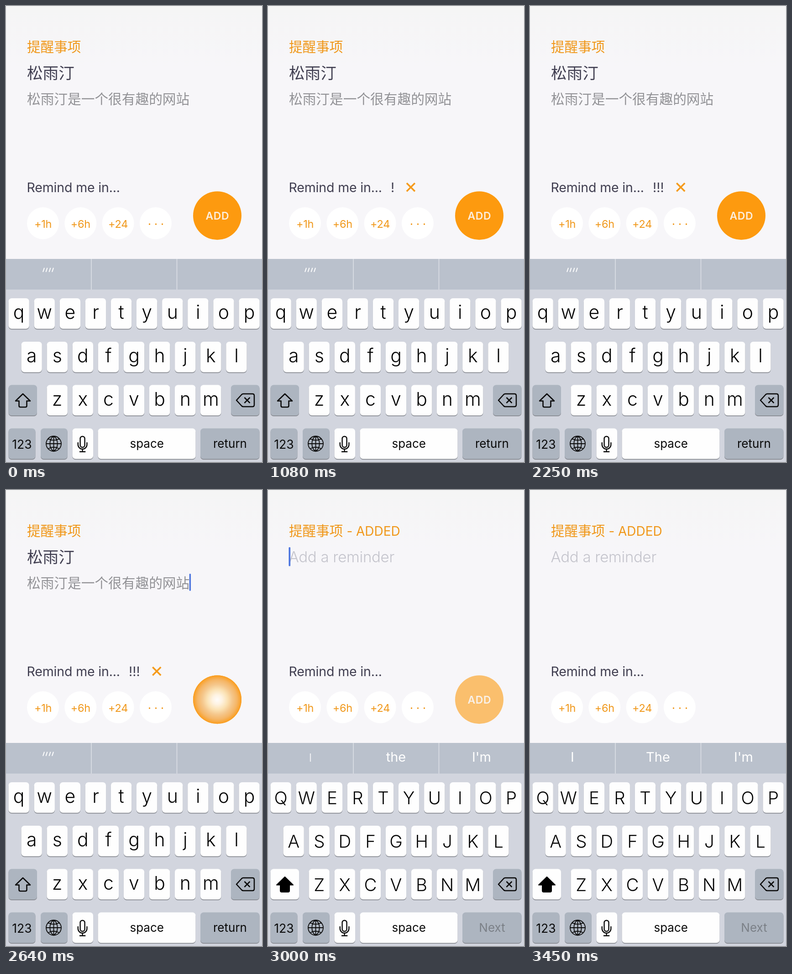
Animation of 561 by 997 pixels, one loop 3660 ms. Source, as an HTML page:

```html
<!DOCTYPE html>
<html lang="zh-CN">
<head>
<meta charset="utf-8">
<title>Reminder</title>
<style>
html, body { margin: 0; width: 100%; height: 100%; overflow: hidden; background: #f7f6f9; }
svg { display: block; width: 561px; height: 997px; }
text { font-family: Inter, "Noto Sans CJK SC", "Noto Sans CJK", sans-serif; white-space: pre; }
.cjk { font-family: "Noto Sans CJK SC", "Noto Sans CJK", sans-serif; }
</style>
</head>
<body>
<svg id="stage" viewBox="0 0 561 997" xmlns="http://www.w3.org/2000/svg">
  <defs>
    <linearGradient id="paper" x1="0" y1="0" x2="0" y2="1">
      <stop offset="0" stop-color="#f5f5f5"/>
      <stop offset=".25" stop-color="#f7f6f9"/>
    </linearGradient>
    <radialGradient id="glow" gradientUnits="userSpaceOnUse" cx="463" cy="458.3" r="53">
      <stop offset="0" stop-color="#fefcfa"/>
      <stop offset=".2" stop-color="#fef3e2"/>
      <stop offset=".42" stop-color="#fbe2b4"/>
      <stop offset=".62" stop-color="#f5c78c"/>
      <stop offset=".82" stop-color="#f5b565"/>
      <stop offset="1" stop-color="#fb9d1d"/>
    </radialGradient>
  </defs>
</svg>
<script>
const LOOP = 3660;
const ORANGE = '#fd9a0f', LABEL = '#f0981b', INK = '#413f51', GRAY = '#adb5c0';
const stage = document.getElementById('stage');

function add(parent, tag, attrs, content) {
  const el = document.createElementNS('http://www.w3.org/2000/svg', tag);
  for (const k in attrs) el.setAttribute(k, attrs[k]);
  if (content !== undefined) el.textContent = content;
  parent.appendChild(el);
  return el;
}
const group = (parent = stage) => add(parent, 'g', {});
const rect = (p, x, y, width, height, fill, rx = 0) => add(p, 'rect', { x, y, width, height, fill, rx });
const disc = (p, cx, cy, r, fill) => add(p, 'circle', { cx, cy, r, fill });
const line = (p, d, stroke, width, extra = {}) =>
  add(p, 'path', { d, stroke, 'stroke-width': width, fill: 'none', 'stroke-linejoin': 'round', ...extra });
const text = (p, str, x, y, size, fill, extra = {}) =>
  add(p, 'text', { x, y, 'font-size': size, fill, ...extra }, str);
const mid = (p, str, x, y, size, fill, extra = {}) =>
  text(p, str, x, y, size, fill, { 'text-anchor': 'middle', ...extra });

function key(p, x, y, w, fill = '#fefefe') {
  rect(p, x, y + 1.7, w, 66.8, '#898c93', 7);
  rect(p, x, y, w, 66.8, fill, 7);
}

// Upper panel
rect(stage, 0, 0, 561, 553, 'url(#paper)');
text(stage, '提醒事项', 46, 99.5, 29.6, LABEL, { class: 'cjk' });

const draft = group();
text(draft, '松雨汀', 46, 159, 34.6, INK, { class: 'cjk', 'font-weight': 300 });
text(draft, '松雨汀是一个很有趣的网站', 46, 214.3, 29.7, '#929296', { class: 'cjk', 'font-weight': 300 });

const empty = group();
text(empty, '-', 172.5, 99.5, 28, LABEL);
text(empty, 'ADDED', 193, 99.5, 28, LABEL);
text(empty, 'Add a reminder', 45.5, 158.3, 33, '#c4c4cc', { 'font-weight': 300, 'letter-spacing': -0.3 });

const noteCaret = rect(stage, 401.7, 183, 3.4, 37.5, '#4d76df', 1.5);
const titleCaret = rect(stage, 45.4, 125, 3.7, 41.5, '#4d76df', 1.5);

text(stage, 'Remind me in...', 45.5, 407, 28.5, INK, { 'letter-spacing': -0.15 });
const marks = text(stage, '', 269, 407, 28.5, INK);
const cross = line(stage, 'M-9 -9 L9 9 M9 -9 L-9 9', '#f59a1a', 3.6);

['+1h', '+6h', '+24', ''].forEach((s, i) => {
  const x = 81 + i * 82.3;
  disc(stage, x, 475, 35, '#fff');
  if (s) mid(stage, s, x, 485, 23.5, LABEL, { 'letter-spacing': -0.3 });
});
for (const x of [314.5, 328.5, 342.5]) disc(stage, x, 477, 1.7, LABEL);

const button = group();
disc(button, 463, 458.3, 53, ORANGE);
mid(button, 'ADD', 463.3, 467, 23, '#fceedd', { 'font-weight': 600, 'letter-spacing': 0.5 });
const glow = disc(button, 463, 458.3, 53, 'url(#glow)');

// Suggestion bar
rect(stage, 0, 553, 561, 67, '#bac1cc');
for (const x of [186, 373.5]) rect(stage, x, 553, 2, 67, '#d6dae2');
const quotes = line(stage, 'M84 572.5 L81 581.5 M90.5 572.5 L87.5 581.5 M97.5 572.5 L94.5 581.5 M104 572.5 L101 581.5', '#fff', 2);
const words = group();
const wordI = mid(words, 'I', 93, 594, 29, '#fff');
const wordThe = mid(words, 'the', 280.5, 594, 29, '#fff');
mid(words, "I'm", 468, 594, 29, '#fff');

// Keyboard
rect(stage, 0, 620, 561, 377, '#d2d5de');
const lower = group(), upper = group();
const rows = [['qwertyuiop', 5.5, 639], ['asdfghjkl', 33.5, 734], ['zxcvbnm', 89.5, 828.5]];
const keys = group();
for (const [letters, x0, y] of rows) {
  [...letters].forEach((c, i) => {
    const x = x0 + i * 56.1;
    key(keys, x, y, 45.3);
    mid(lower, c, x + 22.7, y + 45, 41, '#050505', { 'font-weight': 300 });
    mid(upper, c.toUpperCase(), x + 22.7, y + 48, 38.5, '#050505', { 'font-weight': 300 });
  });
}
key(keys, 493, 828.5, 62.5, GRAY);
line(keys, 'M505 862 L516.5 849.5 Q518 848 520 848 H540 Q544 848 544 852 V872 Q544 876 540 876 H520 Q518 876 516.5 874.5 Z M522.5 856 L534.5 868 M534.5 856 L522.5 868', '#0a0a0a', 2.5);

key(lower, 5.5, 828.5, 62.5, GRAY);
line(lower, 'M37 848 L53 863.5 H45.5 V874 Q45.5 877 42.5 877 H31.5 Q28.5 877 28.5 874 V863.5 H21 Z', '#0a0a0a', 2.6);
key(upper, 5.5, 828.5, 62.5);
line(upper, 'M37 846 L55 863.5 H47 V876 Q47 879 44 879 H30 Q27 879 27 876 V863.5 H19 Z', '#000', 2, { fill: '#000' });

key(keys, 5.5, 923.5, 59, GRAY);
mid(keys, '123', 35, 968, 26.5, '#0a0a0a');
key(keys, 76, 923.5, 58.7, GRAY);
line(keys, 'M88 957 a16.5 16.5 0 1 0 33 0 a16.5 16.5 0 1 0 -33 0 H121 M104.5 940.5 V973.5 ' +
  'M104.5 940.5 C93.5 947 93.5 967 104.5 973.5 C115.5 967 115.5 947 104.5 940.5 ' +
  'M92.5 946 Q104.5 953 116.5 946 M92.5 968 Q104.5 961 116.5 968', '#0a0a0a', 1.8);
key(keys, 145.5, 923.5, 45.5);
line(keys, 'M162.6 946 a5 5 0 0 1 10 0 V960 a5 5 0 0 1 -10 0 Z M157.8 954 V959 a9.8 9.8 0 0 0 19.6 0 V954 M167.6 969 V974.5 M161 974.5 H174.3', '#0a0a0a', 2.4);
key(keys, 201.5, 923.5, 214);
mid(keys, 'space', 308.7, 965.5, 26, '#0a0a0a');
key(keys, 426, 923.5, 129.5, GRAY);
const action = mid(keys, 'return', 491, 965.5, 26, '#0a0a0a');
stage.append(lower, upper);

// Motion
const ramp = (t, a, b) => Math.min(1, Math.max(0, (t - a) / (b - a)));
const show = (el, on) => el.setAttribute('display', on ? 'inline' : 'none');
const fade = (el, v) => el.setAttribute('opacity', v.toFixed(3));

function draw(t) {
  const added = t >= 2850;
  const count = added ? 0 : [960, 1770, 2250].filter(at => t >= at).length;

  show(draft, !added);
  show(empty, added);
  show(lower, !added);
  show(upper, added);
  show(quotes, !added);
  show(words, added);

  fade(noteCaret, added ? 0 :
    ramp(t, 320, 470) - ramp(t, 850, 1080) + ramp(t, 1300, 1470) - ramp(t, 1850, 2070) + ramp(t, 2260, 2370));
  fade(titleCaret, added ? 1 - ramp(t, 3230, 3450) : 0);

  marks.textContent = '!'.repeat(count);
  show(cross, count > 0);
  cross.setAttribute('transform', `translate(${304.2 + count * 8.7} 396.3)`);

  const press = ramp(t, 2500, 2640) - ramp(t, 2760, 2900);
  fade(glow, press);
  glow.setAttribute('r', 53 * Math.sqrt(press));
  fade(button, 1 - ramp(t, 2880, 3180));

  const settled = t >= 3060;
  wordThe.textContent = settled ? 'The' : 'the';
  wordI.setAttribute('font-size', settled ? 29 : 24);
  fade(wordI, settled ? 1 : 0.75);
  action.textContent = added ? 'Next' : 'return';
  action.setAttribute('fill', added ? '#7b8087' : '#0a0a0a');
}

const start = performance.now();
function tick() {
  draw((performance.now() - start) % LOOP);
  requestAnimationFrame(tick);
}
tick();
</script>
</body>
</html>
```
